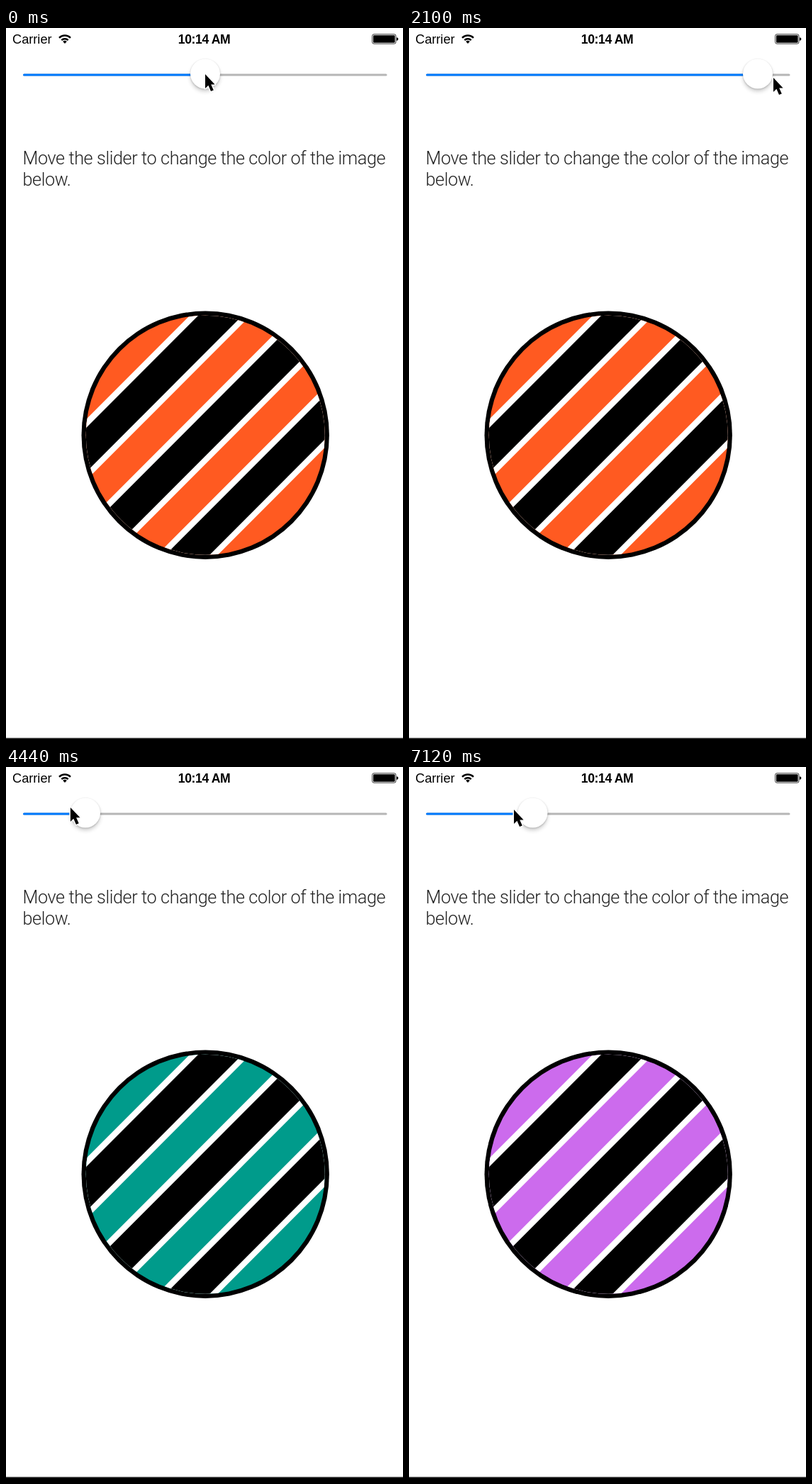
Animation, 560 px wide and 1001 px high, one loop 7140 ms. Source, as an HTML page:

```html
<!DOCTYPE html>
<html lang="en">
<head>
<meta charset="utf-8">
<title>Hue slider</title>
<style>
html, body { margin: 0; width: 100%; height: 100%; overflow: hidden; background: #fff; }
svg { display: block; width: 560px; height: 1001px; }
.status { font: 18.2px "Liberation Sans", Arial, sans-serif; }
.clock { font-weight: 700; font-size: 17.6px; letter-spacing: -.4px; }
.intro { font: 300 25.2px Roboto, Inter, sans-serif; letter-spacing: -.38px; fill: #222; }
</style>
</head>
<body>
<svg viewBox="0 0 560 1001">
  <defs>
    <clipPath id="disc"><circle cx="281.2" cy="573.2" r="168.5"/></clipPath>
    <filter id="soft" x="-50%" y="-50%" width="200%" height="200%"><feGaussianBlur stdDeviation="3"/></filter>
    <filter id="faint" x="-50%" y="-50%" width="200%" height="200%"><feGaussianBlur stdDeviation="1"/></filter>
  </defs>
  <rect width="560" height="1001" fill="#fff"/>

  <text class="status" x="9" y="22">Carrier</text>
  <text class="status clock" x="279.5" y="22" text-anchor="middle">10:14 AM</text>
  <g fill="none" stroke="#000" stroke-width="2.4">
    <path d="M75 13.8a11.2 11.2 0 0 1 16 0M78.3 17.2a6.6 6.6 0 0 1 9.4 0"/>
    <path d="M83 22l-2.8-2.9a4 4 0 0 1 5.6 0z" fill="#000" stroke="none"/>
  </g>
  <rect x="516.6" y="8.8" width="33.4" height="13.4" rx="2.4" fill="none" stroke="#000" stroke-width=".8"/>
  <rect x="518" y="10.2" width="30.6" height="10.6" rx="1.2"/>
  <path d="M551 13.2q2.4 .4 2.4 2.4t-2.4 2.4z"/>

  <path d="M25.5 66H536" stroke="#b6b6b6" stroke-width="3" stroke-linecap="round"/>
  <path id="fill" stroke="#007aff" stroke-width="3" stroke-linecap="round"/>
  <g id="thumb">
    <circle cy="4" r="20" opacity=".24" filter="url(#soft)"/>
    <circle cy=".6" r="21" opacity=".18" filter="url(#faint)"/>
    <circle r="21" fill="#fff"/>
  </g>

  <text class="intro" x="23.5" y="192">Move the slider to change the color of the image</text>
  <text class="intro" x="23.5" y="222">below.</text>

  <circle cx="281.2" cy="573.2" r="174.7"/>
  <g id="stripes" clip-path="url(#disc)"></g>
  <rect y="999" width="560" height="1" fill="#999"/>
  <rect y="1000" width="560" height="1" fill="#181818"/>

  <path id="cursor" d="M0 0V20L4.4 15.8 8 24 11.8 22.4 8.2 14.4H13.6Z"
    stroke="#fff" stroke-width="3" stroke-linejoin="round" paint-order="stroke"/>
</svg>
<script>
const LOOP = 7140;
const $ = id => document.getElementById(id);

// Each row: time, then values eased towards from the row before.
const thumbPath = [[0, 281], [683, 281], [1900, 492], [2900, 492], [3200, 494], [3340, 494],
  [4350, 112], [5000, 113], [5980, 113], [6750, 174.5], [LOOP, 174.5]];
const cursorPath = [[0, 281, 65], [620, 281, 65], [920, 308, 66], [1900, 514, 70], [2600, 514, 70],
  [3200, 500, 65], [3340, 500, 65], [4350, 91, 57], [5000, 89, 56], [5980, 89, 56],
  [6750, 148, 60], [LOOP, 148, 60]];
const hues = [[0, '#ff5a21'], [2700, '#009b8b'], [5200, '#0094d7'], [6780, '#cc6bed']];

// Diagonal band between two values of x + y.
const band = (color, a, b) => `<polygon fill="${color}" points="${a - 800},800 ${a - 300},300 ` +
  `${b - 300},300 ${b - 800},800"/>`;
const stripe = s => band('#fff', s, s + 85.8) + band('#000', s + 12, s + 74.3);
$('stripes').innerHTML = '<rect id="ink" x="100" y="390" width="362" height="366"/>' +
  [0, 1, 2].map(i => stripe(664 + i * 145.4)).join('');

const ease = p => p * p * (3 - 2 * p);

function at(path, t) {
  const i = path.findIndex(row => row[0] > t);
  const a = path[i - 1], b = path[i];
  const k = ease((t - a[0]) / (b[0] - a[0]));
  return a.slice(1).map((v, n) => v + (b[n + 1] - v) * k);
}

// While dragging right, the cursor keeps pace with the thumb.
function cursorAt(t) {
  if (t < 920 || t > 1900) return at(cursorPath, t);
  const from = at(thumbPath, 920)[0];
  const k = (at(thumbPath, t)[0] - from) / (492 - from);
  return [308 + 206 * k, 66 + 4 * k];
}

function draw(t) {
  const [x] = at(thumbPath, t);
  const [cx, cy] = cursorAt(t);
  $('fill').setAttribute('d', `M25.5 66H${x}`);
  $('thumb').setAttribute('transform', `translate(${x} 64.5)`);
  $('cursor').setAttribute('transform', `translate(${cx} ${cy})`);
  $('ink').setAttribute('fill', hues.filter(h => h[0] <= t).pop()[1]);
}

const start = performance.now();
function tick() {
  const t = Math.max(0, performance.now() - start) % LOOP;
  draw(Math.floor(t / 20) * 20);
  requestAnimationFrame(tick);
}
tick();
</script>
</body>
</html>
```
